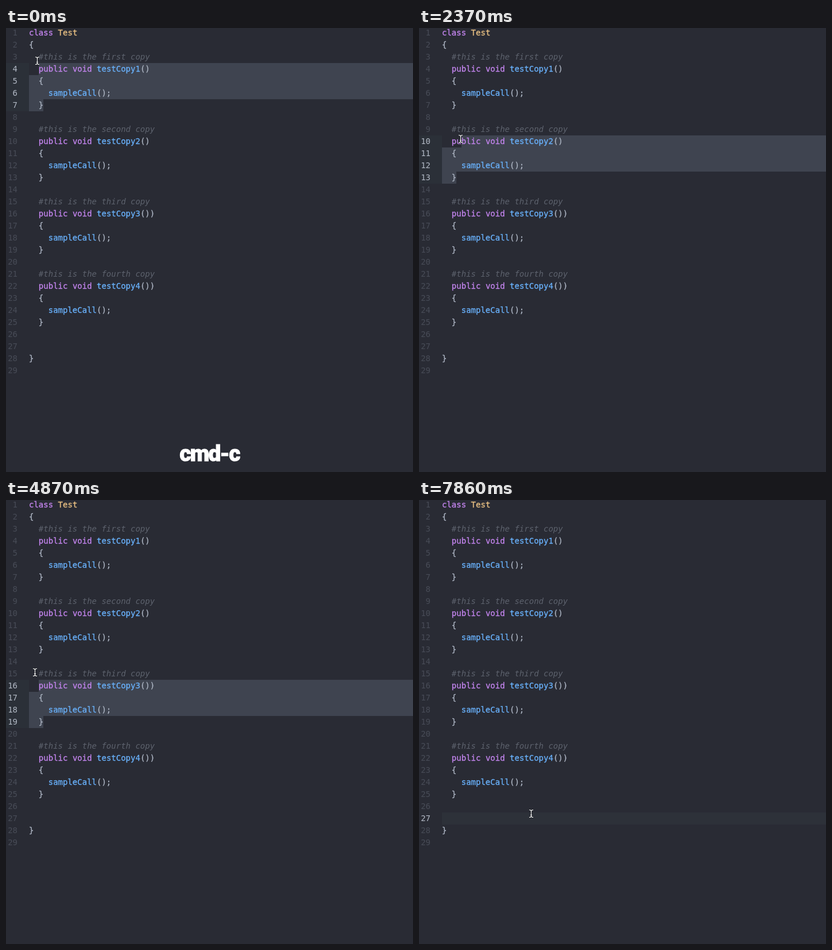
Animation of 709 by 773 pixels, one loop 8 s. Source, as an HTML page:

```html
<!DOCTYPE html>
<html lang="en">
<head>
<meta charset="utf-8">
<title>Copying code blocks</title>
<style>
  html, body { margin: 0; width: 100%; height: 100%; overflow: hidden; background: #292b34; }
  #stage {
    position: relative; width: 709px; height: 773px; overflow: hidden;
    color: #acb4c2; font: 14px/21px "DejaVu Sans Mono", monospace;
  }
  #stage div, #pointer { position: absolute; }
  #marks, #code { left: 0; top: 0; width: 709px; height: 773px; }
  .line, .num, .sel, .gutter, .active, .caret { height: 21px; }
  .line { left: 40px; white-space: pre; -webkit-text-stroke: .3px; }
  .num { left: 0; width: 20px; text-align: right; color: #484c57; }
  .num.on { color: #b3bac6; }
  .kw { color: #c485ef; }
  .type { color: #e9c083; }
  .fn { color: #69b1fb; }
  .note { color: #5d626d; font-style: italic; -webkit-text-stroke: 0; }
  .sel { background: #3f4450; }
  .gutter { left: 0; width: 40px; background: #2b3038; }
  .active { left: 40px; right: 0; background: #2d3139; }
  .caret { left: 65px; width: 2px; background: #528bff; }
  .match { left: 57px; width: 9px; height: 1px; background: #528bff; }
  #caption {
    left: 0; width: 709px; top: 718px; text-align: center; color: #fff;
    font: 900 39px/46px Impact, Roboto, sans-serif; letter-spacing: -1.8px;
    -webkit-text-stroke: 1px #fff;
  }
  #pointer { left: -5.5px; top: -8px; }
</style>
</head>
<body>
<div id="stage">
  <div id="marks"></div>
  <div id="code"></div>
  <div id="caption">cmd-c</div>
  <svg id="pointer" width="11" height="16" fill="none">
    <defs>
      <path id="beam" d="M2 1.5Q5 1.5 5.5 3.5Q6 1.5 9 1.5M5.5 3V13M2 14.5Q5 14.5 5.5 12.5Q6 14.5 9 14.5M4 10.5H7"/>
    </defs>
    <use href="#beam" stroke="#1b1d22" stroke-width="2.4"/>
    <use href="#beam" stroke="#fff" stroke-width="1.1"/>
  </svg>
</div>
<script>
const LOOP = 8000, STEPS = 54, ROW = 21, LEFT = 40, WIDTH = 709, CHAR = 8.428;
const ROUND = 16, LEAD = 2, FINISH = 50;
const $ = id => document.getElementById(id);
const rowTop = n => (n - 1) * ROW - 2;
const colX = c => LEFT + c * CHAR;
const span = (cls, s) => `<span class="${cls}">${s}</span>`;
const box = (cls, y, style = '') => `<div class="${cls}" style="top:${y}px;${style}"></div>`;

const block = (word, i) => [
  '  ' + span('note', `#this is the ${word} copy`),
  `  ${span('kw', 'public')} ${span('kw', 'void')} ${span('fn', 'testCopy' + (i + 1))}()${i > 1 ? ')' : ''}`,
  '  {',
  `    ${span('fn', 'sampleCall')}();`,
  '  }',
  ''
];
const lines = [
  `${span('kw', 'class')} ${span('type', 'Test')}`, '{',
  ...['first', 'second', 'third', 'fourth'].flatMap(block),
  '', '}', ''
];
$('code').innerHTML = lines.map((s, i) =>
  `<div class="num" style="top:${rowTop(i + 1)}px">${i + 1}</div>` +
  `<div class="line" style="top:${rowTop(i + 1)}px">${s}</div>`).join('');
const nums = document.querySelectorAll('.num');

// Each round: drag up to `grab`, rest, then glide to `next` and click there
const rounds = [
  { grab: [54, 57], next: [72, 265] },
  { grab: [72, 193], next: [88, 386] },
  { grab: [50, 300], next: [195, 546] }
];

function pointerAt(r, k) {
  if (k < 2) return rounds[r - 1].next;
  const { grab: [x, y], next: [u, v] } = rounds[r];
  const rest = 5 + 1.5 * r;
  const p = Math.min(1, Math.max(0, (k - rest) / (14 - rest)));
  const e = p * p * (3 - 2 * p);
  const bow = 24 * Math.sin(Math.PI * e);
  return [x + (u - x) * e + bow, y + (v - y) * e];
}

function caretMarks(n) {
  const y = rowTop(n), brace = lines[n - 1].trim() === '}';
  const extras = box('caret', y) + box('match', y + 20) + box('match', y + 20 - 2 * ROW);
  return box('active', y) + (brace ? extras : '');
}

function selectionMarks(first, last, col) {
  let html = '';
  for (let n = first; n <= last; n++) {
    const x = n === first ? colX(col) : LEFT;
    const end = n === last ? colX(3) : WIDTH;
    html += box('gutter', rowTop(n)) + box('sel', rowTop(n), `left:${x}px;width:${end - x}px`);
  }
  return html;
}

function draw(step) {
  const turn = Math.floor((step + LEAD) / ROUND);
  const r = Math.min(turn, rounds.length - 1);
  const k = step + LEAD - r * ROUND;
  const [x, y] = pointerAt(r, k);
  const done = step >= FINISH, clicked = done || k < 2;

  const last = done ? 27 : 7 + 6 * r;
  const first = clicked ? last : last - (k === 2 ? 3 : 4);
  const col = k === 2 ? Math.max(2, Math.round((x - LEFT) / CHAR)) : 2;
  $('marks').innerHTML = clicked ? caretMarks(last) : selectionMarks(first, last, col);
  nums.forEach((el, i) => el.classList.toggle('on', i + 1 >= first && i + 1 <= last));

  const copying = turn === r && (k > 2 || step === 0);
  $('caption').style.visibility = copying ? 'visible' : 'hidden';
  $('pointer').style.transform = `translate(${Math.round(x)}px,${Math.round(y)}px)`;
}

const start = performance.now();
let shown = -1;
function tick() {
  const t = (performance.now() - start) % LOOP;
  const step = Math.min(STEPS - 1, Math.floor((t + 15) * STEPS / LOOP));
  if (step !== shown) draw(shown = step);
  requestAnimationFrame(tick);
}
tick();
</script>
</body>
</html>
```
